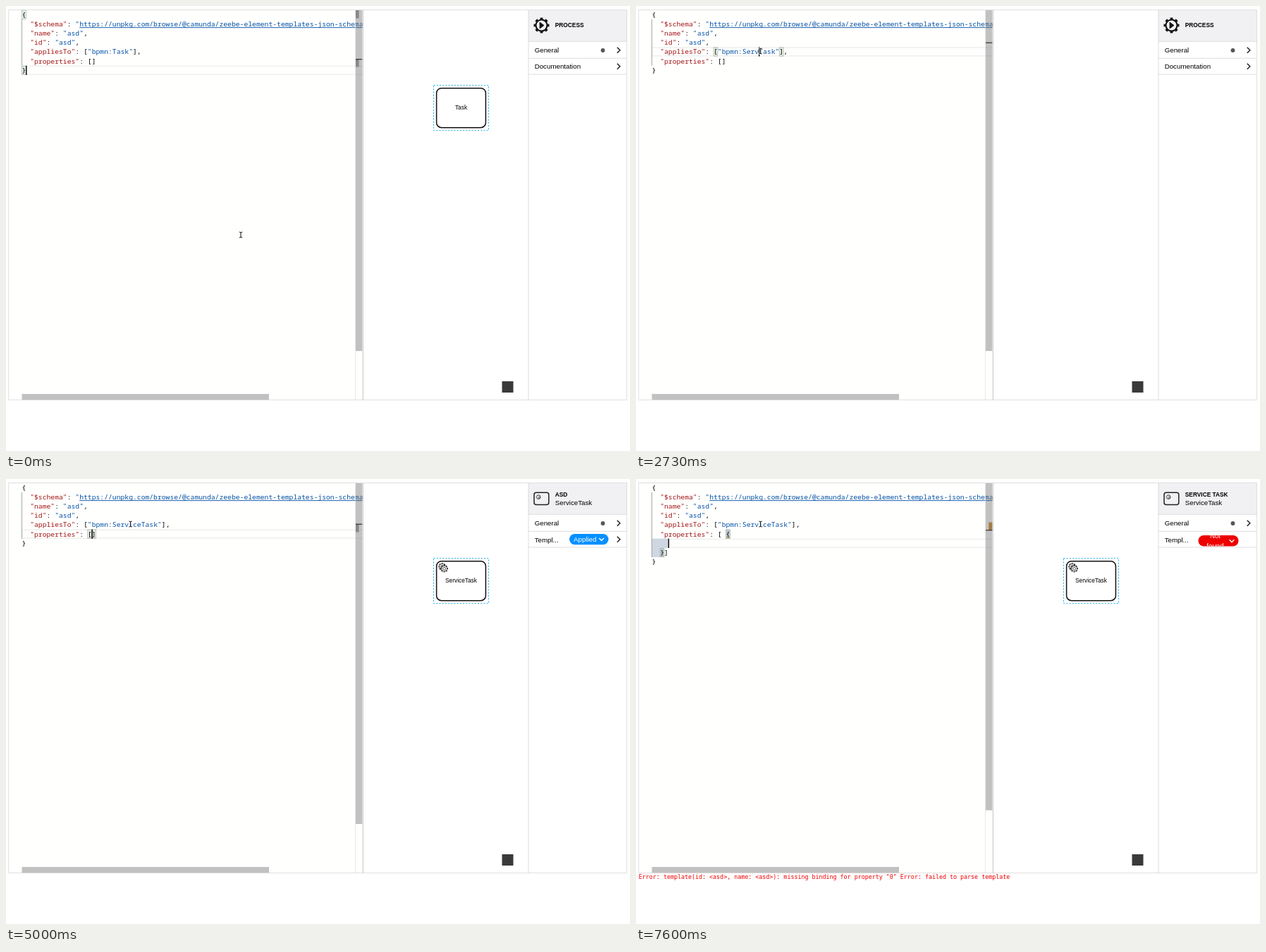
These frames come from a looping animation (885x632 px, 8000 ms). An HTML page:

```html
<!DOCTYPE html>
<html>
<head>
<meta charset="utf-8">
<style>
  html, body { margin: 0; width: 100%; height: 100%; overflow: hidden; background: #fff; }
  svg { display: block; font-family: "Liberation Sans", Arial, sans-serif; }
  text { white-space: pre; }
  .code { font: 9.72px "Noto Sans Mono", monospace; }
  .hint { font: 8.33px "Noto Sans Mono", monospace; }
  .error { font: 8.33px "DejaVu Sans Mono", monospace; fill: #f00000; }
  .label { font-size: 9.72px; }
  .small { font-size: 8.33px; }
  .bold { font-weight: bold; }
</style>
</head>
<body>
<svg id="stage" width="885" height="632" viewBox="0 0 885 632"></svg>
<script>
const LOOP = 8000, TICK = 1000 / 15;
const LEFT = 22.5, TOP = 5.6, CHAR = 5.832, LINE = 13.19;
const stage = document.getElementById('stage');

// Times of the typed letters, of the hidden caret, and the pointer's path as [time, x, y]
const keys = [2270, 2470, 2530, 2730, 2800, 3000, 3130];
const caretOff = [[530, 1070], [1530, 1730], [3600, 4070], [4600, 4800], [6400, 6870], [7400, 7600]];
const pointerPath = [
  [133, 333, 325], [400, 290, 240], [650, 215, 130], [1000, 169, 74], [1130, 165, 67],
  [1400, 153.5, 64.5], [1880, 153.5, 64.5], [2050, 164, 57], [2200, 176.5, 64]
];

const colX = col => LEFT + col * CHAR;
const lineY = line => TOP + line * LINE;

// Picks the value of the last step that has begun; steps are [start, value]
const at = (t, ...steps) => steps.filter(s => s[0] <= t).pop()[1];

const rect = (x, y, w, h, fill, more = '') =>
  `<rect x="${x}" y="${y}" width="${w}" height="${h}" fill="${fill}" ${more}/>`;
const text = (x, y, cls, str, more = '') =>
  `<text x="${x}" y="${y}" class="${cls}" ${more}>${str}</text>`;
const path = (d, color = '#222', width = 1.5, fill = 'none') =>
  `<path d="${d}" fill="${fill}" stroke="${color}" stroke-width="${width}"/>`;
const ring = (x, y, r, width, fill = 'none', more = '') =>
  `<circle cx="${x}" cy="${y}" r="${r}" fill="${fill}" stroke="#111" stroke-width="${width}" ${more}/>`;
const gear = (x, y, r, tooth, width, fill) =>
  ring(x, y, r + tooth / 2, tooth, 'none', 'pathLength="16" stroke-dasharray="1 1" stroke-dashoffset=".5"') +
  ring(x, y, r, width, fill);
const chevron = y => path(`M866.8 ${y - 4}l4 4l-4 4`);
const chevronDown = (x, y) => path(`M${x - 3.3} ${y - 1.7}l3.3 3.4l3.3 -3.4`, '#fff');

function colored(line) {
  return line.replace(/"[^"]*"?(:?)/g, (token, colon) => {
    const word = colon ? token.slice(0, -1) : token;
    return `<tspan fill="${colon ? '#a31515' : '#0451a5'}">${word}</tspan>${colon}`;
  });
}

function pointer(t) {
  const now = Math.floor((t + 10) / TICK) * TICK;
  const next = pointerPath.findIndex(p => p[0] > now);
  let [, x, y] = pointerPath[next < 0 ? pointerPath.length - 1 : 0];
  if (next > 0) {
    const [a, b] = pointerPath.slice(next - 1, next + 1);
    const k = (now - a[0]) / (b[0] - a[0]);
    x = a[1] + (b[1] - a[1]) * k;
    y = a[2] + (b[2] - a[2]) * k;
  }
  const beam = `M${x - 2.3} ${y - 4}q2.3 0 2.3 1.2q0 -1.2 2.3 -1.2M${x} ${y - 3}v6` +
    `M${x - 2.3} ${y + 4}q2.3 0 2.3 -1.2q0 1.2 2.3 1.2`;
  return path(beam, '#fff', 2.2) + path(beam, '#222', 1.1);
}

function popup(x) {
  return rect(x, 85.4, 298.5, 13.6, '#0060c0', 'stroke="#c8c8c8" stroke-width=".6"') +
    rect(x + 4, 89.2, 4, 5.6, 'none', 'stroke="#5d8fc8" stroke-width=".8"') +
    text(x + 13.2, 95.2, 'code bold', '{}', 'fill="#fff"') +
    text(x + 227, 95.2, 'hint', 'Default value', 'fill="#b8d2ee"');
}

function editor(t) {
  const n = keys.filter(k => k <= t).length;
  const split = t >= 7600;
  const lines = [
    '{',
    '  "$schema": "https://unpkg.com/browse/@camunda/zeebe-element-templates-json-schema',
    '  "name": "asd",',
    '  "id": "asd",',
    `  "appliesTo": ["bpmn:${'Service'.slice(0, n)}Task"],`,
    ...at(t, [0, ['  "properties": []']], [5600, ['  "properties": [ ]']],
      [5930, ['  "properties": [ {}]']], [7600, ['  "properties": [ {', '', '  }]']]),
    '}'
  ];
  const [row, col] = at(t, [0, [6, 1]], [1730, [4, 22 + n]], [4800, [5, 18]], [5000, [5, 17]],
    [5600, [5, 18]], [5930, [5, 19]], [7600, [6, 4]]);
  const brackets = at(t, [0, [[0, 0], [6, 0]]], [1730, [[4, 15], [4, 27 + n]]],
    [4800, [[5, 16], [5, 17]]], [5600, [[5, 16], [5, 18]]], [5930, [[5, 16], [5, 20]]],
    [6000, [[5, 18], [5, 19]]], [7600, [[5, 18], [7, 2]]]);
  const cursorMark = at(t, [0, 75], [1730, 51.5], [4800, 63.5], [7600, 72]);
  const bracketMarks = at(t, [0, [6, 75]], [1730, []], [4800, [64]], [7600, []]);

  let out = rect(4, 6, 502, 553.5, '#fffffe');
  out += rect(LEFT, lineY(row) + .7, 484, LINE - 1.4, 'none', 'stroke="#eee" stroke-width="1.4"');
  if (split) {
    out += rect(LEFT, lineY(6), 4 * CHAR, LINE, '#cfd7e2') + rect(LEFT, lineY(7), 3 * CHAR, LINE, '#cfd7e2') +
      rect(colX(18), lineY(5), CHAR, LINE, '#cfd7e2');
  }
  out += rect(LEFT - .3, lineY(1), .8, LINE * (lines.length - 2), '#939393');
  for (const [r, c] of brackets) {
    out += rect(colX(c), lineY(r) + .4, CHAR, LINE - .8, 'rgba(0,100,0,.1)', 'stroke="#b0b0b0" stroke-width=".7"');
  }
  lines.forEach((line, i) => out += text(LEFT, lineY(i) + 9.96, 'code', colored(line)));
  out += rect(colX(14), 30.2, 403, .9, '#0451a5');
  if (t >= 6730) {
    out += path(`M${colX(18)} 84l1.5 -1.5l1.5 1.5l1.5 -1.5l1.3 1.3`, '#bf8803', .7);
  }
  if (!caretOff.some(([a, b]) => t >= a && t < b)) {
    out += rect(colX(col) - .2, lineY(row), 1.4, LINE, '#000');
  }

  // Overview ruler and scrollbars
  out += rect(495.3, 6, .7, 553.5, '#ddd');
  for (const y of bracketMarks) out += rect(496, y, 4.5, 11.5, '#a0a0a0');
  if (t >= 6730) out += rect(500.3, split ? 61.5 : 63, 5.2, 11.3, '#d2892a');
  out += rect(496, cursorMark, 9.5, 1.4, 'rgba(0,0,0,.8)');
  out += rect(496, 6, 9.5, split ? 464.5 : 484, 'rgba(100,100,100,.4)');
  out += rect(22.5, 551, 350.5, 8.5, '#c1c1c1');
  if (t >= 5600 && t < 6200) out += popup(colX(col) + .4);
  return `<g clip-path="url(#pane)">${out}</g>`;
}

function diagram(t) {
  // Plain square in place of the corner mark
  let out = rect(703.5, 533, 16, 16, '#3a3a3a');
  if (t >= 2330 && t < 3130) return out;
  const service = t >= 3130;
  out += rect(606.5, 112.7, 78, 64, 'none', 'stroke="#1fb0e6" stroke-width="1" stroke-dasharray="2.1 2.1"');
  out += rect(610.6, 116.7, 69.8, 56, '#fff', 'rx="7" stroke="#111" stroke-width="1.5"');
  if (service) {
    for (const [x, y] of [[618.7, 124.6], [621.6, 127.2]]) {
      out += gear(x, y, 4, 1.4, .8, '#fff') + ring(x, y, 1.9, .7);
    }
  }
  return out + text(645.5, 147.2, 'small', service ? 'ServiceTask' : 'Task', 'text-anchor="middle"');
}

function properties(t) {
  let out = rect(741, 6, 139.5, 44, '#f1f1f4');
  for (const y of [49.8, 73.8, 96.6]) out += rect(741, y, 139.5, .8, '#d4d4d4');
  out += text(749.7, 66.4, 'label', 'General') + chevron(62.7);
  out += '<circle cx="846.5" cy="63" r="2.9" fill="#55555c"/>';
  if (t < 3130) {
    return out + gear(759.5, 27.5, 8, 3, 2.1, '#f1f1f4') +
      path('M757 23l6 4.5l-6 4.5z', '#111', .8, '#111') +
      text(778.8, 30.2, 'small bold', 'PROCESS') +
      text(749.7, 89.4, 'label', 'Documentation') + chevron(85.8);
  }
  const missing = t >= 5930;
  out += rect(749, 19.2, 20.8, 17.4, 'none', 'rx="3" stroke="#222" stroke-width="1.5"');
  out += gear(755.2, 25.6, 2.6, .9, .6, '#f1f1f4') + ring(756.2, 26.4, 1.2, .6);
  out += text(778.8, 25, 'small bold', missing ? 'SERVICE TASK' : 'ASD');
  out += text(778.8, 36.6, 'label', 'ServiceTask') + text(749.7, 89.6, 'label', 'Templ...');
  if (!missing) {
    return out + rect(799, 78, 55.5, 15.2, '#0590ff', 'rx="7.6"') +
      text(805, 89.1, 'label', 'Applied', 'fill="#fff"') + chevronDown(844.6, 85.8) + chevron(85.8);
  }
  const white = 'fill="#fff" text-anchor="middle"';
  return out + rect(797.5, 80, 57, 15.4, '#ee0000', 'rx="7.7"') +
    `<g clip-path="url(#pill)">${text(821.5, 83.7, 'label', 'Not', white)}${text(821.5, 97.8, 'label', 'found', white)}</g>` +
    chevronDown(845, 88);
}

function scene(t) {
  let out = '<clipPath id="pane"><rect x="3" y="5" width="502.6" height="555"/></clipPath>' +
    '<clipPath id="pill"><rect x="797.5" y="80" width="57" height="15.4" rx="7.7"/></clipPath>';
  out += editor(t) + diagram(t) + properties(t);
  out += rect(3.8, 5.6, 876.8, 554, 'none', 'stroke="#d8d8d8" stroke-width=".8"');
  out += rect(505.8, 6, .9, 553.5, '#bdbdbd') + rect(740.6, 6, .8, 553.5, '#d4d4d4');
  if (t >= 5930) {
    out += text(3.8, 567.8, 'error', 'Error: template(id: &lt;asd&gt;, name: &lt;asd&gt;): ' +
      'missing binding for property "0" Error: failed to parse template');
  }
  return out + pointer(t);
}

const start = performance.now();
function draw() {
  stage.innerHTML = scene((performance.now() - start) % LOOP);
  requestAnimationFrame(draw);
}
draw();
</script>
</body>
</html>
```
